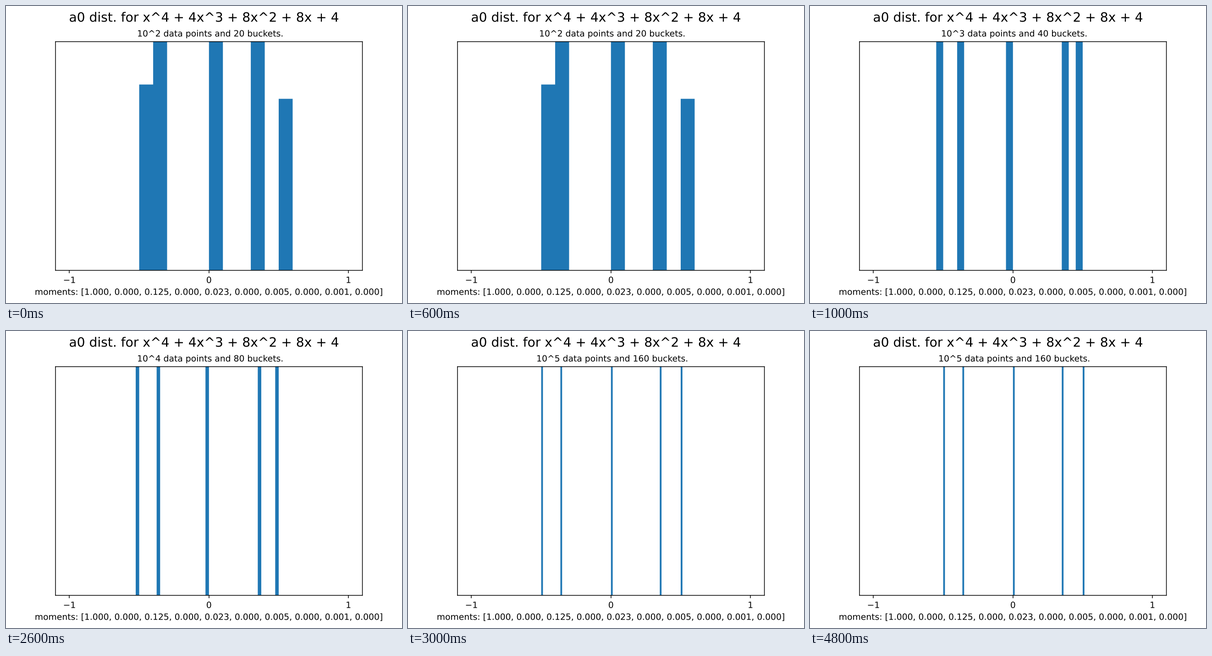
Animation, 864 px wide and 648 px high, one loop 6000 ms. Source, as a matplotlib script:

```python
import matplotlib.pyplot as plt
import numpy as np
from matplotlib.animation import FuncAnimation
from matplotlib.patheffects import Normal

# Smooth subpixel edges, with text drawn as unhinted outlines.
plt.rcParams.update({
    "font.family": "DejaVu Sans",
    "text.hinting": "none",
    "path.snap": False,
    "path.effects": [Normal()],
})

# Limiting distribution of a0: five atoms and their probabilities.
ROOT = np.sqrt(2) / 4
ATOMS = np.array([-1 / 2, -ROOT, 0, ROOT, 1 / 2])
WEIGHTS = np.array([1, 2, 2, 2, 1]) / 8
LAST_STAGE = 3


def moment(n):
    return round(float(WEIGHTS @ ATOMS**n), 3) + 0.0  # avoids "-0.000"


def histogram(stage):
    """Bucket the expected counts for 10^(stage + 2) points."""
    points, buckets = 10 ** (stage + 2), 20 * 2**stage
    counts = np.diff(np.ceil(points * np.cumsum(WEIGHTS)), prepend=0)
    # A slight sampling bias decides the side for atoms on a bucket edge.
    bias = 1e-3 * np.cos(2 * np.pi * stage / 3)
    edges = np.linspace(-1, 1, buckets + 1)
    return np.histogram(ATOMS + bias, edges, weights=counts)


fig, ax = plt.subplots(figsize=(6.4, 4.8), dpi=135)
fig.suptitle("a0 dist. for x^4 + 4x^3 + 8x^2 + 8x + 4", fontsize=15)
title = ax.set_title("", fontsize=10)
ax.set_xlabel("moments: [" + ", ".join(f"{moment(n):.3f}" for n in range(10)) + "]")
bars = ax.stairs(*histogram(0), fill=True, color="tab:blue")
ax.set(xlim=(-1.1, 1.1), ylim=(0, 16), xticks=[-1, 0, 1], yticks=[])


def update(second):
    stage = min(second, LAST_STAGE)
    values, edges = histogram(stage)
    bars.set_data(values, edges)
    title.set_text(f" 10^{stage + 2} data points and {len(values)} buckets.")
    return bars, title


anim = FuncAnimation(fig, update, frames=6, interval=1000, repeat=True)
plt.show()
```
